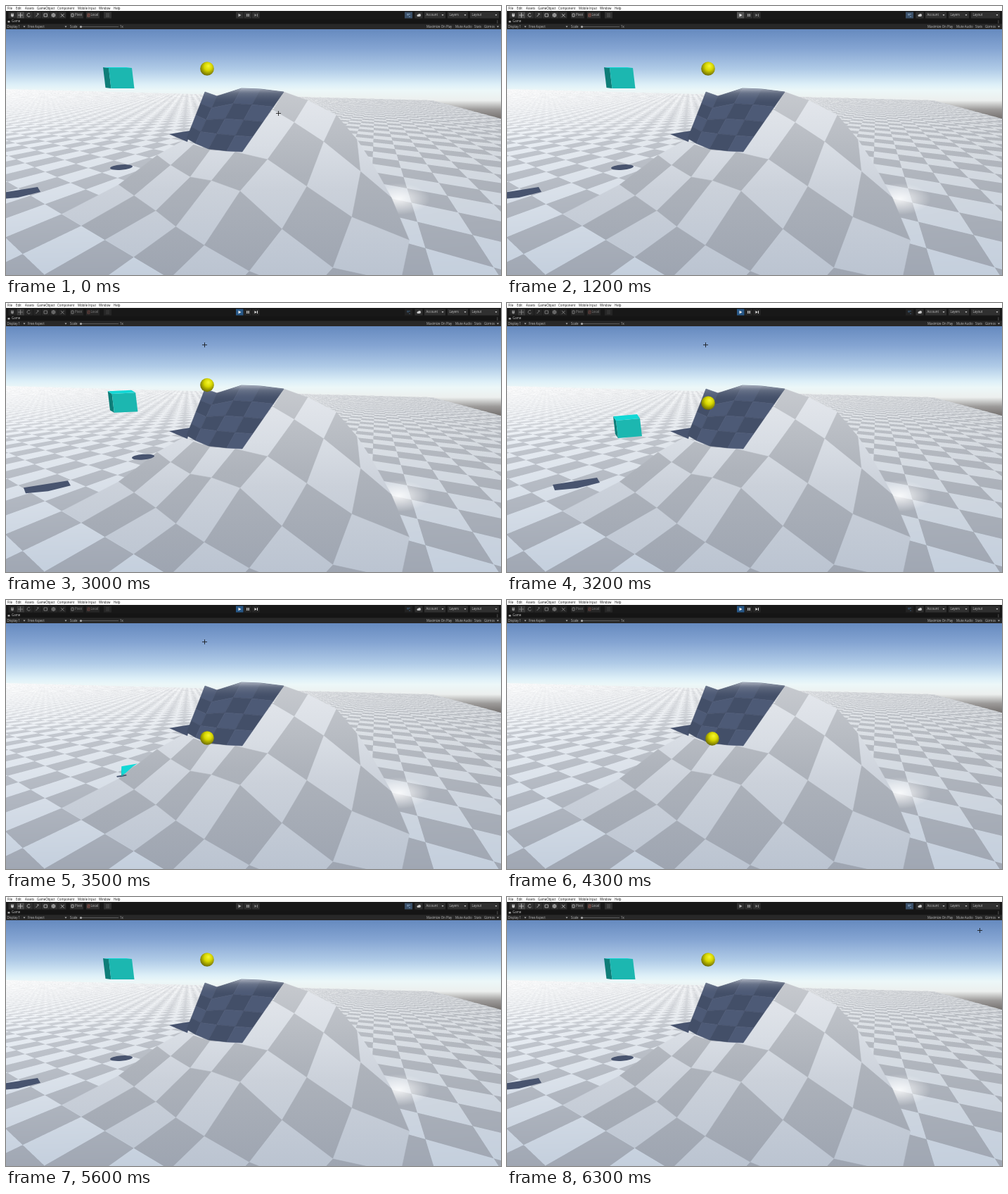
Write an HTML page with a canvas that moves like this. It is 704 by 382 pixels and loops after 6400 ms.

```html
<!DOCTYPE html>
<html lang="en">
<head>
<meta charset="utf-8">
<title>Physics test scene</title>
<style>
html, body { margin: 0; width: 704px; height: 382px; overflow: hidden; background: #000; }
canvas { display: block; }
</style>
</head>
<body>
<canvas id="stage" width="704" height="382"></canvas>
<script>
const W = 704, H = 382, LOOP = 6400;
const HOVER = 600, PRESS = 1300, PLAY = 2800, STOP = 5400;
const g = document.getElementById('stage').getContext('2d');
const clamp = v => Math.max(0, Math.min(1, v));
const lerp = (a, b, p) => a + (b - a) * p;
const mix = (u, v, p) => u.map((c, n) => lerp(c, v[n], p));
const add = (u, v) => [u[0] + v[0], u[1] + v[1]];
const ease = p => p * p * (3 - 2 * p);

function layer() {
  const c = document.createElement('canvas');
  c.width = W;
  c.height = H;
  return c.getContext('2d');
}

function poly(c, pts, fill, seam) {
  c.beginPath();
  pts.forEach(p => c.lineTo(p[0], p[1]));
  c.closePath();
  c.fillStyle = fill;
  c.fill();
  if (seam) {
    c.strokeStyle = fill;
    c.lineWidth = 0.6;
    c.stroke();
  }
}

function vertical(c, ...stops) {
  const y0 = stops[0][0], y1 = stops[stops.length - 1][0];
  const grad = c.createLinearGradient(0, y0, 0, y1);
  stops.forEach(([y, col]) => grad.addColorStop((y - y0) / (y1 - y0), col));
  return grad;
}

// Ground plane: camera at height 1, focal length 302, tile size TILE.
const TILE = 0.315, A0 = 0.88, B0 = 1.14;

function ground(i, j) {
  const a = A0 - (j - 2) * TILE, b = B0 - (i + 1) * TILE;
  const x = 0.479 * a - 0.877 * b;
  const y = 0.953 - 0.266 * a - 0.145 * b;
  const z = 0.303 + 0.837 * a + 0.457 * b;
  return [352 + 302 * x / z, 208 + 302 * y / z];
}

// 1 = grey tile, 0 = light tile, -1 = beyond the plane
function tileAt(x, y) {
  const rx = x - 352, ry = y - 208, d = (ry + 96) * 0.953;
  if (d <= 0) return -1;
  const a = (0.479 * rx - 0.266 * ry + 252.8) / d;
  const b = (-0.877 * rx - 0.145 * ry + 138) / d;
  if (a > 18.8 || b < -3.58) return -1;
  return (Math.floor((B0 - b) / TILE) + Math.floor((A0 - a) / TILE) + 1) & 1;
}

function drawFloor(c) {
  const f = layer(), img = f.createImageData(W, H), N = 3;
  for (let y = 112; y < H; y++) {
    for (let x = 0; x < W; x++) {
      let hit = 0, grey = 0;
      for (let n = 0; n < N * N; n++) {
        const v = tileAt(x + (n % N + 0.5) / N, y + ((n / N | 0) + 0.5) / N);
        if (v >= 0) { hit++; grey += v; }
      }
      if (!hit) continue;
      const k = clamp((y - 118) / 264), o = (y * W + x) * 4;
      const haze = clamp(1 - (y - 116) / 75) * clamp(1 - x / 480);
      const dim = 1 - 0.11 * x / W * (1 - k);
      const light = mix([249, 251, 253], [196, 207, 221], k ** 0.9);
      const dark = mix([220, 223, 227], [160, 167, 179], k ** 0.7);
      mix(light, dark, grey / hit).forEach((v, ch) => {
        img.data[o + ch] = lerp(v * dim, 252, haze * 0.8);
      });
      img.data[o + 3] = 255 * hit / (N * N);
    }
  }
  f.putImageData(img, 0, 0);
  c.drawImage(f.canvas, 0, 0);
}

// Doubles a row of key points with smooth in-between points.
function smooth(keys) {
  const at = n => keys[Math.max(0, Math.min(keys.length - 1, n))];
  return keys.flatMap((p, n) => n === keys.length - 1 ? [p] : [p, p.map((v, q) =>
    (9 * (v + at(n + 1)[q]) - at(n - 1)[q] - at(n + 2)[q]) / 16)]);
}

// Hill rows from crest to foot, every second grid point.
const HILL = [
  [[395,122],[470,155],[520,222]],
  [[380,148],[452,193],[548,272]],
  [[254,190],[290,205],[372,218],[492,300],[640,355]],
  [[215,212],[262,243],[333,263],[465,372],[640,400]],
  [[160,254],[213,291],[282,340],[430,410],[660,430]]
].map(smooth);
const RIDGE = [[283,122],[300,128],[335,117],[362,118],[395,122]];
const BASIN = smooth([[257,188],[288,203],[336,207]]);
const SHADE = '#48546f';

function drawHill(c) {
  const rows = [...HILL, HILL[4].map((_, n) => ground(n - 4, 3))];
  const light = vertical(c, [118, '#e5e8ed'], [200, '#d8dde4'], [260, '#cbd1da'], [382, '#bbc4d1']);
  const grey = vertical(c, [118, '#c7cacf'], [240, '#aeb3bb'], [382, '#9ea5b1']);
  const at = (i, j) => rows[j + 2][j < 0 ? i + 1 : i + 4];
  for (let j = -2; j < 3; j++) {
    for (let i = j < 0 ? -1 : -4; i < 3; i++) {
      const cell = [at(i, j), at(i + 1, j), at(i + 1, j + 1), at(i, j + 1)];
      poly(c, cell, (i + j) & 1 ? grey : light, true);
    }
  }
  // shaded inner face
  poly(c, [[232,182],[262,177],[258,193]], SHADE);
  const face = (n, r) => mix(RIDGE[n], BASIN[n], r / 4);
  for (let n = 0; n < 4; n++) {
    for (let r = 0; r < 4; r++) {
      const cell = [face(n, r), face(n + 1, r), face(n + 1, r + 1), face(n, r + 1)];
      poly(c, cell, (n + r) & 1 ? '#434f68' : '#4d5a76', true);
    }
  }
  const rim = vertical(c, [116, 'rgba(195,200,210,.9)'], [124, 'rgba(135,143,160,.45)'], [138, 'rgba(80,90,115,0)']);
  poly(c, [...RIDGE, [384,138], [275,148]], rim);
}

const scene = (() => {
  const c = layer();
  c.fillStyle = vertical(c, [33, '#668abf'], [60, '#84a4d2'], [90, '#b0cbe7'], [112, '#def0f8'],
    [120, '#ecf7f8'], [134, '#ecefee'], [147, '#9c9a99'], [160, '#74706e']);
  c.fillRect(0, 33, W, 349);
  drawFloor(c);
  c.save();
  c.translate(558, 274);
  c.scale(1, 0.5);
  const glow = c.createRadialGradient(0, 0, 0, 0, 0, 45);
  glow.addColorStop(0, 'rgba(255,255,255,.85)');
  glow.addColorStop(1, 'rgba(255,255,255,0)');
  c.fillStyle = glow;
  c.fillRect(-45, -45, 90, 90);
  c.restore();
  drawHill(c);
  return c.canvas;
})();

function text(str, x, y, col) {
  g.fillStyle = col;
  g.fillText(str, x, y);
}

function box(x, y, w, h, col) {
  g.fillStyle = col;
  g.fillRect(x, y, w, h);
}

function disc(x, y, r, col) {
  g.fillStyle = col;
  g.beginPath();
  g.arc(x, y, r, 0, 7);
  g.fill();
}

function path(d, col) {
  g.strokeStyle = col;
  g.lineWidth = 0.8;
  g.stroke(new Path2D(d));
}

const arrow = (x, y, col) => poly(g, [[x - 1.5, y - 1], [x + 1.5, y - 1], [x, y + 1]], col);

function drawBars(t) {
  const active = t >= PRESS && t < STOP, playing = t >= PLAY && t < STOP;
  const hot = t >= HOVER && t < PLAY;
  const ink = active ? '#8a8a8a' : '#c4c4c4', btn = active ? '#262626' : '#303030';
  g.font = '4.4px "Open Sans", "Noto Sans", sans-serif';
  g.textBaseline = 'middle';
  box(0, 0, W, 7, '#fff');
  [['File', 2], ['Edit', 14], ['Assets', 27], ['GameObject', 44], ['Component', 73],
   ['Mobile Input', 102], ['Window', 132], ['Help', 153]].forEach(([s, x]) => text(s, x, 3.5, '#111'));

  box(0, 7, W, 12, '#181818');
  for (let n = 0; n < 7; n++) box(3.5 + n * 11.8, 8.5, 11, 9, n === 1 ? (active ? '#3a3a3a' : '#4b4b4b') : btn);
  box(91, 8.5, 19, 9, btn);
  box(114, 8.5, 19, 9, btn);
  box(139, 8.5, 11, 9, btn);
  // hand, move, rotate, scale, rect, transform, custom tools
  disc(9, 13.5, 2, ink);
  path('M7.5 13v-2.5M9 13v-3M10.5 13v-2.5M17 13h7M20.5 9.5v7M34 11a2.4 2.4 0 1 0 .5 3M42.5 15l4-4h-2.5' +
    'M54 11h4.5v4h-4.5zM65.5 11h4v4h-4zM67.5 10v6M64.5 13h6M78 11l4.5 4.5M82.5 11l-4.5 4.5M93 11h3v4h-3z', ink);
  path('M116 11h3v4h-3zM116 14.5l2.5-3', active ? '#71443f' : '#9c5a50');
  path('M142 11h5M142 13h5M142 15h5', active ? '#444' : '#666');
  text('Pivot', 98, 13, ink);
  text('Local', 120.5, 13, ink);

  [327, 338.5, 350].forEach((x, n) => box(x, 8.5, 10.5, 9, n ? btn : playing ? '#285887' : hot ? '#555' : btn));
  const live = playing ? '#e4e4e4' : '#b4b4b4';
  poly(g, [[330.5, 10.8], [334.5, 13], [330.5, 15.2]], playing || hot ? '#eee' : live);
  box(342.2, 11, 1.2, 4, live);
  box(344.6, 11, 1.2, 4, live);
  const step = playing ? live : '#888';
  poly(g, [[353.5, 11], [356.5, 13], [353.5, 15]], step);
  box(357, 11, 1, 4, step);

  box(567, 8.5, 11, 9, playing ? '#222' : '#3b5069');
  path('M570 11.5h5M570 13h3M573 15h2', playing ? '#3f5f7c' : '#8faac6');
  box(581.5, 8.5, 11, 9, '#303030');
  disc(586, 13.5, 1.5, '#ccc');
  disc(588, 13, 2, '#ccc');
  [['Account', 595, 30], ['Layers', 628, 29], ['Layout', 660, 41]].forEach(([s, x, w]) => {
    box(x, 8.5, w, 9, '#303030');
    text(s, x + 2.5, 13, '#c4c4c4');
    arrow(x + w - 4, 13, '#c4c4c4');
  });

  box(0, 19, W, 6.5, '#151515');
  box(2.5, 21, 3, 2.5, '#aaa');
  text('Game', 8, 22.3, '#c4c4c4');
  for (let n = 0; n < 3; n++) box(698.5, 20.4 + n * 1.6, 0.8, 0.8, '#aaa');

  box(0, 25.5, W, 7.5, '#282828');
  [['Display 1', 1.5], ['Free Aspect', 31], ['Scale', 91], ['1x', 162], ['Maximize On Play', 598],
   ['Mute Audio', 639], ['Stats', 666], ['Gizmos', 680]].forEach(([s, x]) => text(s, x, 29.5, '#bbb'));
  [26, 85, 699.5].forEach(x => arrow(x, 29.5, '#bbb'));
  path('M105 29.5h55', '#666');
  disc(106.5, 29.5, 1.6, '#aaa');
}

// Free fall is well under way when the first played picture appears;
// drop is 0 at rest and 1 after 713 ms of falling.
const dropAt = t => t >= PLAY && t < STOP ? ((t - 2487) / 713) ** 2 : 0;

function drawCube(drop) {
  if (drop > 2.4) return;
  const a = mix([138, 87], [151, 161], drop);
  const depth = mix([8, 1], [4, 6], drop), right = mix([33, 0], [34, -3], drop);
  const down = mix([3.5, 29], [3, 25], drop);
  const b = add(a, depth), c = add(b, right);

  const [sx, sy] = mix([15, 266], [98, 257], Math.min(drop, 1.8));
  const size = clamp((2.3 - drop) / 1.3);
  const shadow = [[-33, 1], [30, -9], [34, -2], [2, 6], [-30, 9]];
  poly(g, shadow.map(([x, y]) => [sx + x * size, sy + y * size]), SHADE);

  g.save();
  // the ground and the foot of the hill swallow the box
  g.clip(new Path2D('M0 33H704V160L230 205L181 236L163 252H0Z'));
  poly(g, [a, b, add(b, down), add(a, down)], '#0e7d78');
  poly(g, [b, c, add(c, down), add(b, down)], '#1cb7b0');
  poly(g, [a, add(a, right), c, b], '#12d8d6');
  g.restore();
}

function drawBall(t, drop) {
  const roll = drop ? 1 - Math.exp(-Math.max(0, t - 3500) / 450) : 0;
  const x = 286 + 7 * roll, y = Math.min(89 + 53 * drop, 196 + roll);
  if (drop < 0.8) {
    g.fillStyle = SHADE;
    g.beginPath();
    g.ellipse(164 + 60 * drop, 229 - 20 * drop, 16, 3.8, -0.08, 0, 7);
    g.fill();
  }
  const shade = g.createRadialGradient(x + 2, y - 4, 0, x + 1, y - 2, 12);
  shade.addColorStop(0, '#f6f632');
  shade.addColorStop(0.45, '#d8d800');
  shade.addColorStop(1, '#6b6a00');
  disc(x, y, 9.8, shade);
}

// Pointer moves: start, end, target x, y
const MOVES = [[0, 600, 332, 13], [1200, 1900, 282, 59], [3500, 4200, 332, 13],
  [5400, 6000, 663, 45], [6000, 6300, 672, 47]];

function drawPointer(t) {
  const at = MOVES.reduce((p, [t0, t1, ...to]) => mix(p, to, ease(clamp((t - t0) / (t1 - t0)))), [387, 152]);
  const [x, y] = at.map(v => Math.round(v) + 0.5);
  if (y > 34) path(`M${x - 3.5} ${y}h7M${x} ${y - 3.5}v7`, '#111');
}

function frame() {
  const t = Math.floor(performance.now() % LOOP / 100) * 100;
  const drop = dropAt(t);
  g.drawImage(scene, 0, 0);
  drawCube(drop);
  drawBall(t, drop);
  drawBars(t);
  drawPointer(t);
  requestAnimationFrame(frame);
}
frame();
</script>
</body>
</html>
```
